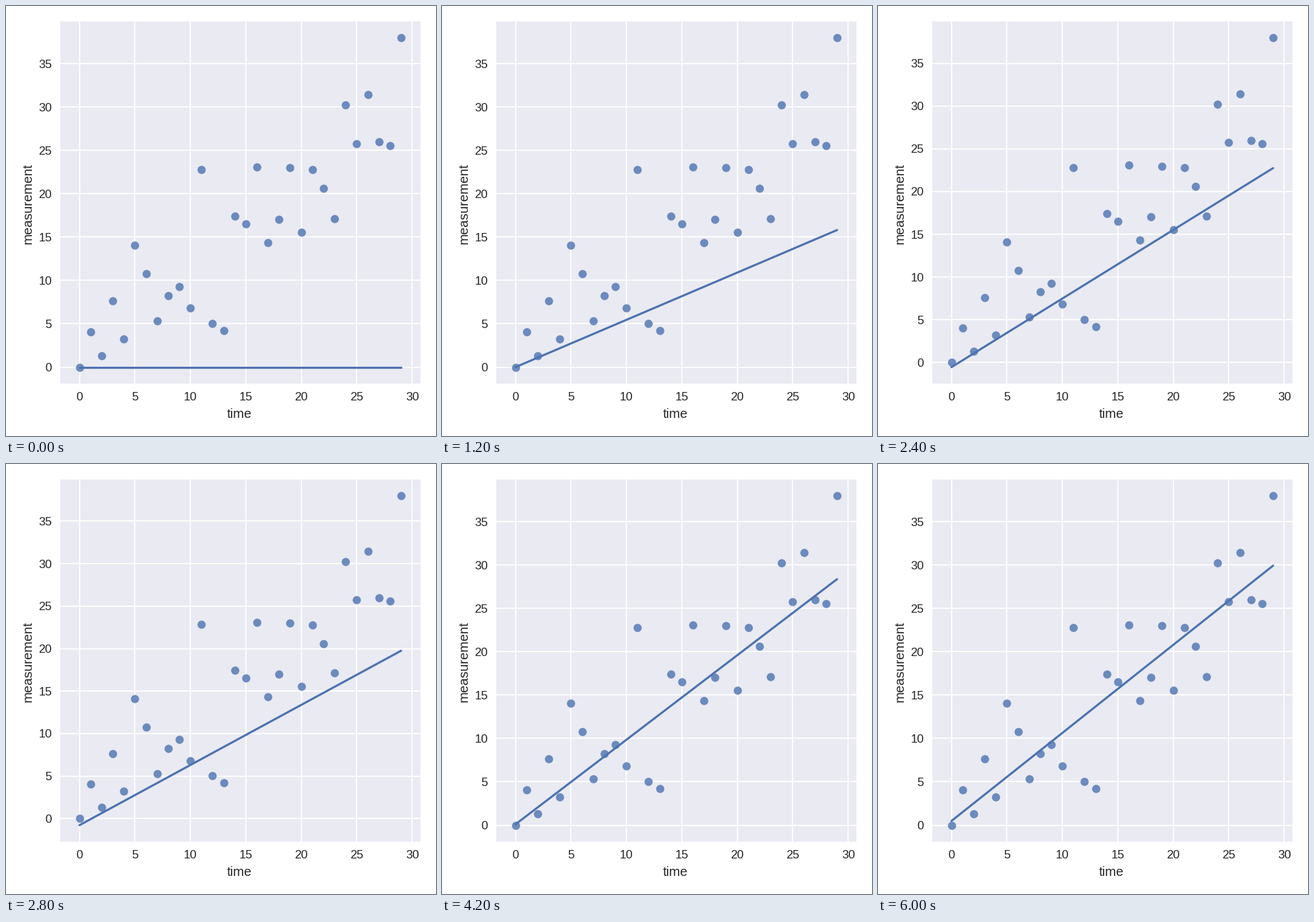
A matplotlib script for the animation above (6.2 s loop, 665 by 665 pixels).

```python
import numpy as np
import matplotlib.pyplot as plt
from matplotlib.animation import FuncAnimation

SIZE, DPI = 665, 133
FRAMES, INTERVAL = 31, 200
BLUE, PANEL, INK = "#4C72B0", "#EAEAF2", "#262626"
LEFT, RIGHT, TOP, BOTTOM = 84, 641, 24, 584

plt.rcParams["font.family"] = "Liberation Sans"

time = np.arange(30)
measurement = np.array([
    0, 4.03, 1.34, 7.61, 3.25, 14.07, 10.78, 5.31, 8.28, 9.29,
    6.81, 22.82, 5.02, 4.22, 17.43, 16.53, 23.08, 14.36, 17.03, 22.98,
    15.57, 22.8, 20.6, 17.13, 30.22, 25.77, 31.42, 25.97, 25.56, 37.96,
])

# Fit progress: step, height of the line at time 0 and at time 29
FIT = np.array([
    (0, 0, 0), (4, 0.13, 8.2), (9, -0.18, 27.23), (14, -0.77, 19.75),
    (21, 0.1, 28.37), (25, 0.15, 28.58), (27, -0.12, 29.1), (30, 0.49, 29.93),
])


def fit_ends(step):
    return [np.interp(step, FIT[:, 0], FIT[:, col]) for col in (1, 2)]


fig = plt.figure(figsize=(SIZE / DPI, SIZE / DPI), dpi=DPI, facecolor="white")
ax = fig.add_axes([LEFT / SIZE, 1 - BOTTOM / SIZE,
                   (RIGHT - LEFT) / SIZE, (BOTTOM - TOP) / SIZE],
                  facecolor=PANEL)
for spine in ax.spines.values():
    spine.set_visible(False)
ax.set_axisbelow(True)
ax.grid(color="white", lw=1)
ax.tick_params(length=0, pad=7, labelsize=10, labelcolor=INK)
ax.set_xticks(range(0, 31, 5))
ax.set_yticks(range(0, 36, 5))
ax.set_xlim(-1.73, 30.75)


def label(x, y, text, angle=0):
    fig.text(x / SIZE, 1 - y / SIZE, text, size=11, color=INK, rotation=angle,
             rotation_mode="anchor", ha="center", va="baseline")


label(361.5, 637, "time")
label(40, 305.5, "measurement", 90)

ax.scatter(time, measurement, s=47, color=BLUE, alpha=0.8, linewidths=0, zorder=2)
line, = ax.plot([0, 29], [0, 0], color=BLUE, lw=1.75,
                solid_capstyle="round", zorder=3)


def update(step):
    ends = fit_ends(step)
    line.set_ydata(ends)
    low = min(0, *ends)
    high = max(measurement.max(), *ends)
    margin = 0.05 * (high - low)
    ax.set_ylim(low - margin, high + margin)
    return line,


anim = FuncAnimation(fig, update, frames=FRAMES, interval=INTERVAL,
                     repeat=True, repeat_delay=0, blit=False)
plt.show()
```
